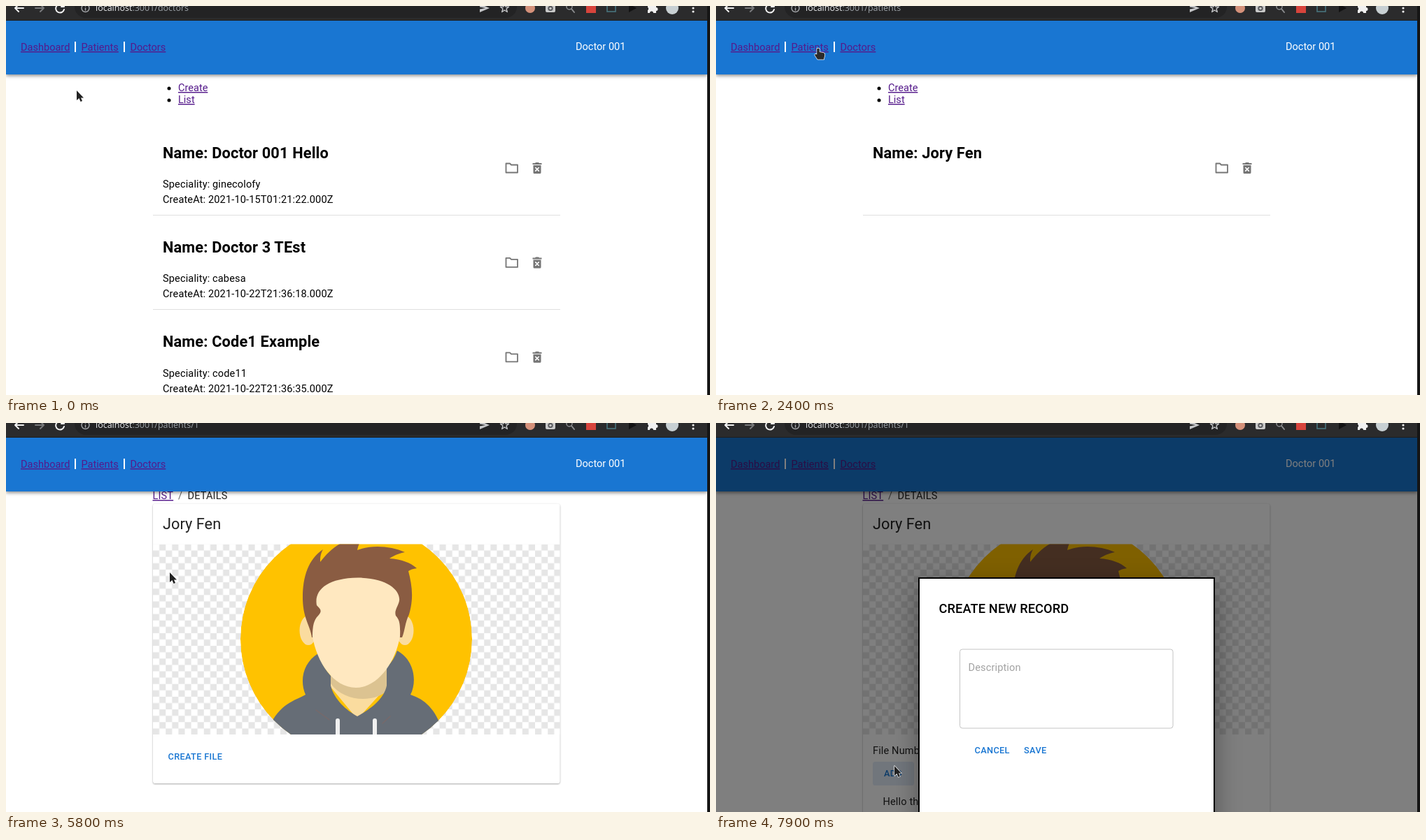
These frames come from a looping animation (1006 by 557 pixels, 8 s). An HTML page:

```html
<!DOCTYPE html>
<html lang="en">
<head>
<meta charset="utf-8">
<title>Clinic records</title>
<style>
html, body { margin: 0; width: 100%; height: 100%; overflow: hidden; background: #fff; }
svg { display: block; }
text { font: 14.55px Roboto, sans-serif; fill: #000; }
.body { letter-spacing: .136px; }
.ink { letter-spacing: .136px; fill: #212121; }
.link { fill: #551a8b; text-decoration: underline; }
.link.red { fill: #f00; }
.h2 { font-size: 21.8px; font-weight: 700; letter-spacing: .136px; }
.h3 { font-size: 17px; font-weight: 700; letter-spacing: .136px; }
.title { font-size: 21.8px; fill: #212121; }
.head { font-size: 18.2px; font-weight: 500; letter-spacing: .136px; }
.btn { font-size: 12.73px; font-weight: 500; letter-spacing: .36px; fill: #1976d2; }
.hint { letter-spacing: .136px; fill: #a2a2a2; }
.white { fill: #fff; }
.url { font: 12.5px "Open Sans", "Noto Sans", sans-serif; fill: #9aa0a6; }
#bar { filter: drop-shadow(0 2px 2px rgba(0,0,0,.3)) drop-shadow(0 1px 3px rgba(0,0,0,.2)); }
.card { filter: drop-shadow(0 1px 1px rgba(0,0,0,.35)); }
#box { filter: drop-shadow(0 12px 18px rgba(0,0,0,.35)); }
</style>
</head>
<body>
<svg id="stage" width="1006" height="557" viewBox="0 0 1006 557"></svg>
<script>
const $ = id => document.getElementById(id);
const text = (x, y, cls, str, id = '') =>
  `<text x="${x}" y="${y}" class="${cls}"${id && ` id="${id}"`}>${str}</text>`;
const rect = (x, y, w, h, fill, more = '') =>
  `<rect x="${x}" y="${y}" width="${w}" height="${h}" fill="${fill}" ${more}/>`;
const circle = (x, y, r, fill) => `<circle cx="${x}" cy="${y}" r="${r}" fill="${fill}"/>`;
const path = (d, fill, more = '') => `<path d="${d}" fill="${fill}" ${more}/>`;
const line = (d, color, w = 2) =>
  path(d, 'none', `stroke="${color}" stroke-width="${w}" stroke-linecap="round" stroke-linejoin="round"`);
const group = (id, inner) => `<g id="${id}">${inner}</g>`;
const rule = (x, y) => rect(x, y, 582, 1, '#e0e0e0');

const defs = `<defs>
<pattern id="check" x="210" y="173.5" width="18.2" height="18.2" patternUnits="userSpaceOnUse">
  ${rect(0, 0, 18.2, 18.2, '#fff')}${rect(9.1, 0, 9.1, 9.1, '#e6e6e6')}${rect(0, 9.1, 9.1, 9.1, '#e6e6e6')}
</pattern>
<clipPath id="disc"><circle cx="500.5" cy="309.5" r="165.5"/></clipPath>
<clipPath id="photo"><rect x="210" y="173.5" width="581.5" height="272.5"/></clipPath>
<g id="person" clip-path="url(#disc)">
  ${circle(500.5, 309.5, 165.5, '#ffc200')}
  ${path('M464 350V378L502 424L544 378V345Z', '#fadc9f')}
  ${path('M464 355V373C482 399 524 401 544 384V345Z', '#dcc391')}
  ${path(`M376 436C390 402 414 397 428 389C419 368 425 343 446 330C450 343 457 354 464 362V376
    C469 396 486 411 502 420C520 410 540 396 544 376V350C551 343 556 335 559 326C583 339 588 369 578 389
    C599 396 613 409 624 440V480H376Z`, '#666d76')}
  ${line('M443 411L462 425M549 420L538 430', '#77696a', 1.5)}
  ${line('M474 426V462M527 426V462', '#f0f0f0', 6)}
  <ellipse cx="432" cy="297" rx="12.5" ry="21" fill="#fadc9f"/>
  <ellipse cx="570" cy="297" rx="12.5" ry="21" fill="#fadc9f"/>
  ${path(`M437 307C435 290 424 280 424 250C424 220 432 195 453 181C449 188 449 193 449 199
    C460 185 473 172 490 168Q500 165 509 166C504 173 503 177 502 182C522 174 550 176 570 185
    C560 187 554 190 548 194C565 195 578 200 587 208Q579 209 575 212C580 232 583 250 576 274
    C570 286 570 298 566 307H560L500 300Z`, '#8a5c42')}
  ${path(`M444 261C440 240 458 222 503 221.5C549 222 567 243 561 258C558 266 555 270 557 276
    C561 281 564 284 563 306C556 345 530 379 500 379C468 379 444 342 438 306C438 290 440 282 446 276
    C452 269 450 267 444 261Z`, '#ffe8c0')}
</g></defs>`;

const avatar = (x, y) =>
  `<use href="#person" transform="translate(${x} ${y}) scale(.11) translate(-500.5 -309.5)"/>`;

const folder = y => path(`M714.5 ${y - 6.5}H720L722 ${y - 4.5}H731V${y + 6.5}H714.5Z`, 'none',
  'stroke="#757575" stroke-width="1.8" stroke-linejoin="round"');
const bin = y => path(`M752.5 ${y - 7}H756L757 ${y - 8}H761L762 ${y - 7}H765.5V${y - 5}H752.5Z
  M753.5 ${y - 4}H764.5V${y + 6.5}Q764.5 ${y + 8} 763 ${y + 8}H755Q753.5 ${y + 8} 753.5 ${y + 6.5}Z`, '#757575') +
  line(`M756.7 ${y - .5}l4.6 4.6m0 -4.6l-4.6 4.6`, '#fff', 1.6);

const bullets = ['Create', 'List'].map((s, i) =>
  circle(233, 118 + 17 * i, 2.5, '#000') + text(246, 122 + 17 * i, 'link', s)).join('');

const row = (i, name, ...info) => {
  const y = 135.4 * i;
  return text(224, 217.5 + y, 'h2', 'Name: ' + name) +
    info.map((s, k) => text(224, 260 + 21.8 * k + y, 'body', s)).join('') +
    folder(232 + y) + bin(232 + y) + rule(210, Math.round(299 + y));
};

const record = (i, title, date) => {
  const y = i ? 21.3 + 118.7 * i : 0;
  return text(217, 147 + y, 'h3', title) + text(217, 187 + y, 'body', date) +
    avatar(751.5, 190 + y) + rule(203, Math.round(i ? 240.4 + 118.9 * i : 240.6));
};

const chrome = rect(0, 0, 1006, 21, '#2b2b2c') + rect(98, -20, 632, 37, '#232324', 'rx="16"') +
  rect(0, 20, 1006, 1, '#1d1d1e') +
  line('M13 3H25M18 -2L13 3L18 8', '#f1f1f1') +
  line('M42 3H54M49 -2L54 3L49 8', '#77787a') +
  line('M82 0A6 6 0 1 0 83 5M83 -3V1H79', '#f1f1f1') +
  `<circle cx="113.5" cy="3" r="5.5" fill="none" stroke="#a5a7aa" stroke-width="1.4"/>` +
  line('M113.5 3V6M113.5 0V.2', '#a5a7aa', 1.4) +
  path('M677 -3L691 3L677 9V4.5L685 3L677 1.5Z', '#c5c6c8') +
  line('M712.5 -3L714 1L718.5 1.3L715 4L716.3 8.5L712.5 6L708.7 8.5L710 4L706.5 1.3L711 1Z', '#c5c6c8', 1.4) +
  circle(749, 3, 7, '#d5917a') +
  rect(771, -3, 14, 12, '#c9c9c9', 'rx="2"') + circle(778, 3.5, 3.6, '#55565a') + circle(778, 3.5, 1.8, '#c9c9c9') +
  `<circle cx="805" cy="1" r="4" fill="none" stroke="#8b8c8e" stroke-width="1.5"/>` + line('M808 4L812 9', '#8b8c8e') +
  rect(829, -4, 14, 14, '#d8443c') +
  rect(859, -3, 12, 11, 'none', 'stroke="#48747d" stroke-width="1.6"') +
  path('M890 -3L901 3L890 9Z', '#121213') +
  path('M917 -2H921A2.5 2.5 0 0 1 926 -2H929V2A2.5 2.5 0 0 1 929 7V10H925A2.3 2.3 0 0 0 920 10H917V6A2.3 2.3 0 0 0 917 2Z', '#f1f1f1') +
  circle(952, 3, 9, '#c8d0d3') +
  [-2, 3, 8].map(y => circle(982, y, 1.6, '#f1f1f1')).join('') +
  `<text x="128" y="7" class="url"><tspan fill="#e8eaed">localhost</tspan><tspan id="path"></tspan></text>`;

const header = rect(0, 21, 1002, 77, '#1976d2', 'id="bar"') +
  ['Dashboard', 'Patients', 'Doctors'].map((s, i) =>
    text([21, 107.5, 177.5][i], 64, 'link', s, 'nav' + i)).join('') +
  rect(98, 51, 2, 15, '#fff') + rect(168, 51, 2, 15, '#fff') +
  text(814, 63, 'white', 'Doctor 001', 'user');

const doctors = bullets +
  row(0, 'Doctor 001 Hello', 'Speciality: ginecolofy', 'CreateAt: 2021-10-15T01:21:22.000Z') +
  row(1, 'Doctor 3 TEst', 'Speciality: cabesa', 'CreateAt: 2021-10-22T21:36:18.000Z') +
  row(2, 'Code1 Example', 'Speciality: code11', 'CreateAt: 2021-10-22T21:36:35.000Z');

const dash = record(0, 'Record 1', '2021-10-15T01:51:16.000Z') + text(217, 223.5, 'link body', 'Jory') +
  record(1, 'dddd', '2021-10-15T02:03:40.000Z') +
  record(2, 'dddd', '2021-10-15T02:03:45.000Z') +
  record(3, 'Hello this is another text', '2021-10-15T14:15:21.000Z') +
  rect(988, 21, 14, 536, '#f1f1f1') + rect(989.5, 35, 11, 530, '#c1c1c1') +
  path('M991 30.5L994.8 26.5L998.6 30.5Z', '#a3a3a3');

const patient = text(209.5, 109, 'link body', 'LIST') +
  `<text x="246" y="109" style="fill:#666">/</text>` + text(259.5, 109, 'ink', 'DETAILS') +
  rect(210, 115.5, 581.5, 400.5, '#fff', 'id="card" class="card" rx="3.6"') +
  text(224, 152, 'title', 'Jory Fen') +
  `<g clip-path="url(#photo)">${rect(210, 173.5, 581.5, 272.5, 'url(#check)')}<use href="#person"/></g>` +
  group('create', text(231.5, 481.5, 'btn', 'CREATE FILE')) +
  group('file', text(224, 474, 'ink', 'File Number: 2') +
    rect(224, 485, 59, 34, '#1976d2', 'id="add" rx="3.6"') + text(240, 506, 'btn', 'ADD') +
    text(238.5, 547, 'ink', 'Hello this is a new record'));

const modal = rect(0, 21, 1002, 536, '#000', 'fill-opacity=".5"') +
  rect(290, 222, 422, 360, '#fff', 'id="box" stroke="#000" stroke-width="2"') +
  text(318.5, 272, 'head', 'CREATE NEW RECORD') +
  rect(348.5, 324, 304.5, 113, 'none', 'rx="3.6" stroke="#c4c4c4"') +
  text(360.5, 354.5, 'hint', 'Description') +
  text(369.5, 472.5, 'btn', 'CANCEL') + text(440, 472.5, 'btn', 'SAVE');

const outline = 'stroke="#fff" stroke-width="1.3" stroke-linejoin="round" paint-order="stroke"';
const cursor = path('M0 0V14L3.4 11L5.6 16L8 15L6 10.4H10Z', '#222', 'id="arrow" ' + outline) +
  path('M-1.8 1Q-1.8 -.6 0 -.6Q1.8 -.6 1.8 1V5L7.5 6Q9.6 6.6 9.4 9L8 15.5H-.8L-4.8 9.4Q-5 6.6 -1.8 8.4Z', '#2b2b2b', 'id="hand" ' + outline);

$('stage').innerHTML = defs + rect(0, 0, 1006, 557, '#fff') +
  group('doctors', doctors) + group('dash', dash) + group('patient', patient) +
  group('patients', bullets + row(0, 'Jory Fen')) +
  group('header', header) + group('modal', modal) +
  chrome + rect(1002, 0, 4, 557, '#151515') + group('cursor', cursor);

// time, page, path, pressed link
const views = [
  [0, 'doctors', '/doctors'], [1000, 'doctors', '/doctors', 0], [1100, '', '/doctors'],
  [1200, 'dash', ''], [2200, 'dash', '', 1], [2300, '', ''],
  [2400, 'patients', '/patients'], [3200, 'patients', '/patients', 2], [3300, '', '/patients'],
  [3400, 'doctors', '/doctors'], [4600, '', '/doctors'],
  [4700, 'dash', ''], [5700, '', ''], [5800, 'patient', '/patients/1']
];

// time, x, y of the pointer
const moves = [
  [0, 101, 121], [100, 101, 121], [300, 137, 48], [400, 137, 48], [800, 45, 58], [1400, 45, 58],
  [1700, 146, 61], [2700, 146, 61], [2800, 200, 63], [3500, 200, 63], [3800, 120, 76],
  [4100, 51, 69], [4200, 51, 69], [4400, 48, 59], [4600, 48, 59], [5300, 234, 214],
  [5800, 234, 214], [6400, 392, 420], [6500, 392, 420], [6900, 206, 470], [7200, 262, 502],
  [7300, 262, 502], [7600, 249, 501], [7700, 249, 501], [7900, 255, 491]
];

const LOOP = 8000, TICK = 100;
const show = (id, on) => $(id).style.display = on ? '' : 'none';
const inside = (x, y, l, t, r, b) => x >= l && x <= r && y >= t && y <= b;

function pointer(t) {
  const i = moves.findLastIndex(m => m[0] <= t);
  const a = moves[i], b = moves[i + 1] || a;
  const k = b === a ? 0 : (t - a[0]) / (b[0] - a[0]);
  return [a[1] + (b[1] - a[1]) * k, a[2] + (b[2] - a[2]) * k];
}

function draw(t) {
  const [, page, url, red] = views.findLast(v => v[0] <= t);
  for (const id of ['doctors', 'dash', 'patient', 'patients']) show(id, id === page);
  for (let i = 0; i < 3; i++) $('nav' + i).classList.toggle('red', i === red);
  $('path').textContent = ':3001' + url;

  const gap = page === 'dash' ? 14 : 0;
  $('bar').setAttribute('width', 1002 - gap);
  $('user').setAttribute('x', 814 - gap);

  const [x, y] = pointer(t);
  const loaded = t >= 5900, open = t >= 7700;
  show('create', !loaded);
  show('file', loaded);
  $('card').setAttribute('height', loaded ? 460 : 400.5);
  const over = inside(x, y, 224, 485, 283, 519);
  $('add').setAttribute('fill-opacity', open ? .12 : over ? .04 : 0);
  show('modal', open);
  $('modal').setAttribute('opacity', open ? Math.min(1, .3 + (t - 7700) / 200 * .7) : 0);

  const hand = [[21, 91], [107, 161], [177, 228]].some(([l, r]) => inside(x, y, l, 51, r, 68)) ||
    page === 'dash' && inside(x, y, 217, 209, 250, 228);
  show('hand', hand);
  show('arrow', !hand);
  $('cursor').setAttribute('transform', `translate(${Math.round(x)} ${Math.round(y)})`);
}

let last = -1;
function frame() {
  const t = Math.floor(performance.now() % LOOP / TICK) * TICK;
  if (t !== last) draw(last = t);
  requestAnimationFrame(frame);
}
frame();
</script>
</body>
</html>
```
